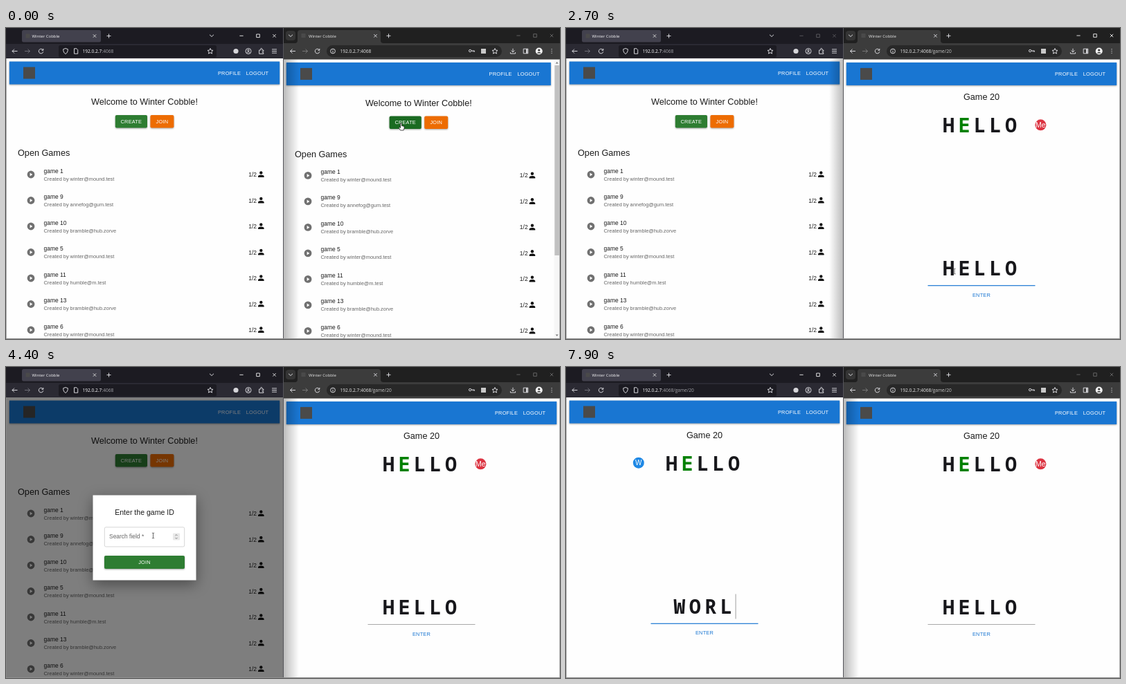
These frames come from a looping animation (800 by 450 pixels, 8 s). An HTML page:

```html
<!DOCTYPE html>
<html lang="en">
<head>
<meta charset="utf-8">
<title>Winter Cobble</title>
<style>
  html, body { margin: 0; width: 100%; height: 100%; overflow: hidden; background: #fff; }
  svg { display: block; width: 800px; height: 450px; }
  text { white-space: pre; font-family: "Liberation Sans", Arial, sans-serif; }
  .ui { font-family: "Open Sans", "Noto Sans", sans-serif; }
  .mono { font-family: "Noto Sans Mono", "DejaVu Sans Mono", monospace; font-weight: 700; }
  .raised { filter: drop-shadow(0 1px 1px rgba(0,0,0,.35)); }
  .dialog { filter: drop-shadow(0 6px 10px rgba(0,0,0,.4)); }
</style>
</head>
<body>
<svg id="stage" viewBox="0 0 800 450"></svg>
<script>
const LOOP = 8000;
const BLUE = '#1976d2', GREEN = '#2e7d32', ORANGE = '#ed6c02', INK = '#1c1c1c';
const APP = 'Winter Cobble', HOST = '192.0.2.7', PORT = ':4068';

// Markup helpers
const rect = (x, y, w, h, fill, more = '') =>
  `<rect x="${x}" y="${y}" width="${w}" height="${h}" fill="${fill}" ${more}/>`;
const circle = (x, y, r, fill, more = '') => `<circle cx="${x}" cy="${y}" r="${r}" fill="${fill}" ${more}/>`;
const text = (x, y, s, size, fill = INK, more = '') =>
  `<text x="${x}" y="${y}" font-size="${size}" fill="${fill}" ${more}>${s}</text>`;
const middle = 'text-anchor="middle"';
const group = (id, body, more = '') => `<g id="${id}" ${more}>${body}</g>`;
const icon = (x, y, d, color = '#e8e8ec', more = '') =>
  `<path transform="translate(${x} ${y})" d="${d}" fill="none" stroke="${color}" stroke-width=".9" ${more}/>`;
const label = (x, y, s, fill) => text(x, y, s, 7.39, fill, 'letter-spacing=".21" text-anchor="middle"');

const ICON = {
  back: 'M4 0H-3.5M-.5-3L-3.5 0L-.5 3',
  forward: 'M-4 0H3.5M.5-3L3.5 0L.5 3',
  reload: 'M3-1.5A3.3 3.3 0 1 0 3.3 .8M3.3-3.6V-1.2H.9',
  cross: 'M-2.2-2.2L2.2 2.2M2.2-2.2L-2.2 2.2',
  plus: 'M-3 0H3M0-3V3',
  chevron: 'M-3-1.3L0 1.5L3-1.3',
  dash: 'M-2.6 0H2.6',
  box: 'M-2.3-2.3H2.3V2.3H-2.3Z',
  shield: 'M0-4L3.3-2.8C3.3 .8 2.2 2.8 0 4C-2.2 2.8-3.3 .8-3.3-2.8Z',
  page: 'M-2.5-3.7H1L2.7-2V3.7H-2.5Z',
  star: 'M0-4L1.2-1.4L4-1.1L1.9 .8L2.5 3.6L0 2.1L-2.5 3.6L-1.9 .8L-4-1.1L-1.2-1.4Z',
  menu: 'M-3.5-2.6H3.5M-3.5 0H3.5M-3.5 2.6H3.5',
  user: 'M-4 0A4 4 0 1 1 4 0A4 4 0 1 1-4 0M-2.4 2.8C-1.5 .8 1.5 .8 2.4 2.8M-1.2-1A1.2 1.2 0 1 1 1.2-1A1.2 1.2 0 1 1-1.2-1',
  puzzle: 'M-3.4-1.5H-1.4V-3A1 1 0 0 1 .8-3V-1.5H2.8V.4H1.7A1 1 0 0 0 1.7 2.2H2.8V3.8H-3.4Z',
  info: 'M-3.4 0A3.4 3.4 0 1 1 3.4 0A3.4 3.4 0 1 1-3.4 0M0-.5V2M0-2V-1.2',
  key: 'M-4 0A1.7 1.7 0 1 1-.6 0A1.7 1.7 0 1 1-4 0M-.6 0H4V1.7M2.2 0V1.6',
  download: 'M0-3.8V1.2M-2.4-1L0 1.4L2.4-1M-3.6 1.6V3.5H3.6V1.6',
  panel: 'M-3.3-3.3H3.3V3.3H-3.3ZM1-3.3V3.3M2-3.3V3.3',
  dots: 'M0-3.4V-2.2M0-.6V.6M0 2.2V3.4'
};
const controls = (id, xs, y) =>
  group(id, ['dash', 'box', 'cross'].map((name, i) => icon(xs[i], y, ICON[name], '#f2f2f2')).join(''));

function foxChrome() {
  return rect(0, 0, 400, 23, '#1c1b22') + rect(0, 23, 400, 21, '#2b2a33') +
    rect(23, 3, 114, 17.5, '#42414d', 'rx="2.5"') + rect(28.5, 8.5, 6, 6, '#4a4a4a') +
    text(37.5, 14, APP, 6, '#f4f4f6', 'class="ui"') +
    icon(128, 11.5, ICON.cross, '#ddd') + icon(148.5, 11.5, ICON.plus) + icon(297, 11, ICON.chevron) +
    controls('foxControls', [340, 364, 387.5], 11.3) +
    rect(76, 25, 228, 17.5, '#1c1b22', 'rx="2.5"') +
    icon(12.5, 33.5, ICON.back) + icon(31, 33.5, ICON.forward, '#77767f') + icon(50.5, 33.5, ICON.reload) +
    icon(86, 33.5, ICON.shield) + icon(101, 33.5, ICON.page) +
    `<text class="ui" x="110.5" y="36" font-size="6.6" fill="#fbfbfe">${HOST}<tspan fill="#a3a3a9">${PORT}<tspan id="foxPath"></tspan></tspan></text>` +
    icon(295, 33.5, ICON.star) + circle(332, 33.5, 3.6, '#d6d6da') + icon(350, 33.5, ICON.user) +
    icon(369, 33.5, ICON.puzzle) + icon(387.5, 33.5, ICON.menu);
}

function darkChrome() {
  return rect(401, 0, 399, 22, '#202020') + rect(401, 22, 399, 23.5, '#3c3c3c') +
    '<path d="M417 22Q421 22 421 18V7Q421 3 425 3H537Q541 3 541 7V18Q541 22 545 22Z" fill="#3c3c3c"/>' +
    rect(404, 4, 14, 14, '#353535', 'rx="4"') + icon(411, 11, ICON.chevron) +
    rect(426.5, 8, 6, 6, '#4a4a4a') + text(437, 13.7, APP, 6, '#e6e6e6', 'class="ui"') +
    icon(533.5, 11.3, ICON.cross) + icon(552.5, 11.3, ICON.plus) +
    controls('darkControls', [740, 764, 788], 11) +
    rect(463, 25, 253, 17, '#282828', 'rx="8.5"') +
    icon(414, 33.5, ICON.back) + icon(432, 33.5, ICON.forward, '#7d7d7d') + icon(449.5, 33.5, ICON.reload) +
    icon(472, 33.5, ICON.info) +
    `<text class="ui" x="482.5" y="36" font-size="6.6" fill="#e8e8e8">${HOST}${PORT}<tspan id="darkPath" fill="#c4c4c4"></tspan></text>` +
    icon(672.5, 33, ICON.key) + rect(686, 30, 7, 7, '#c9c9c9') + icon(706, 33.5, ICON.star) +
    icon(732, 33.5, ICON.download) + icon(750.5, 33.5, ICON.panel) +
    circle(769.7, 33.5, 5, '#f2f2f2') + circle(769.7, 32, 1.6, '#333') +
    '<path d="M766.6 36.6Q769.7 32.8 772.8 36.6Z" fill="#333"/>' + icon(788, 33.5, ICON.dots, '#e8e8ec', 'stroke-width="1.3"');
}

const header = w =>
  rect(4.8, 48.5, w - 9.6, 33, BLUE, 'class="raised"') + rect(25, 56.5, 17, 17, '#4a4a4a') +
  label(w - 77.5, 67.6, 'PROFILE', '#fff') + label(w - 37, 67.6, 'LOGOUT', '#fff');

const button = (id, x, y, w, h, s, fill) =>
  rect(x, y, w, h, fill, `id="${id}" rx="2" class="raised"`) + label(x + w / 2, y + h / 2 + 2.7, s, '#fff');

const WINTER = 'winter@mound.test', BRAMBLE = 'bramble@hub.zorve';
const GAMES = [[1, WINTER], [9, 'annefog@gum.test'], [10, BRAMBLE], [5, WINTER],
  [11, 'humble@m.test'], [13, BRAMBLE], [6, WINTER]];

function gameRow([number, owner], i, w) {
  const y = 212 + i * 37.5, x = w - 31.7;
  return circle(36, y, 5.4, '#707070') + `<path d="M34.6 ${y - 2.5}L38.3 ${y}L34.6 ${y + 2.5}Z" fill="#fff"/>` +
    text(54.5, y - 2.4, 'game ' + number, 8.45) +
    text(54.5, y + 8.6, 'Created by ' + owner, 7.39, '#666') +
    text(w - 38, y + 3.1, '1/2', 8.45, INK, 'text-anchor="end"') +
    circle(x, y - 2.6, 2.2, '#111') +
    `<path d="M${x - 4.3} ${y + 4}V${y + 2.8}C${x - 4.3} ${y - .3} ${x + 4.3} ${y - .3} ${x + 4.3} ${y + 2.8}V${y + 4}Z" fill="#111"/>`;
}

function homePage(side, w) {
  const c = w / 2;
  return header(w) + text(c, 111.3, `Welcome to ${APP}!`, 12.67, INK, middle) +
    button(side + 'Create', c - 42.2, 126, 46.2, 18.6, 'CREATE', GREEN) +
    button(side + 'Join', c + 8.4, 126, 34, 18.6, 'JOIN', ORANGE) +
    text(17, 185.2, 'Open Games', 12.67) + GAMES.map((game, i) => gameRow(game, i, w)).join('');
}

// Spaced bold letters, centred as one run around x
const STEP = 22.5;
const word = (x, y, s, greenAt = -1) => [...s].map((ch, i) =>
  text(x - s.length * STEP / 2 + 8.9 + i * STEP, y, ch, 28.5, i === greenAt ? '#008000' : '#17171b', `class="mono" ${middle}`)).join('');

const gamePage = (side, avatar) =>
  header(400) + text(200, 103, 'Game 20', 12.67, INK, middle) +
  group(side + 'Guess', word(200, 149.7, 'HELLO', 1) + avatar) +
  group(side + 'Typed', '') + rect(200, 328.5, .7, 36, '#777', `id="${side}Caret"`) +
  rect(122.5, 370.7, 155, 1, '#949494', `id="${side}Line"`) + label(200, 387.4, 'ENTER', BLUE);

const avatar = (x, y, s, size, fill) => circle(x, y, 8, fill) + text(x, y + 3.6, s, size, '#fff', middle);

function dialog() {
  return rect(125.5, 185.5, 149, 123, '#fff', 'class="dialog"') +
    text(200, 214.2, 'Enter the game ID', 10.56, INK, middle) +
    rect(142.3, 231.8, 115.4, 28.2, 'none', 'id="fieldBox" rx="2"') +
    rect(147, 230, 42, 4, '#fff', 'id="notch"') +
    text(149, 248.3, 'Search field *', 8.45, '#666', 'id="fieldLabel"') +
    text(149, 248.6, '', 8.45, INK, 'id="fieldValue"') +
    rect(241, 240.5, 10, 10, '#e9e9e9', 'rx="1"') +
    icon(246, 243.3, 'M-1.6 .8L0-.8L1.6 .8M-1.6 3.6L0 5.2L1.6 3.6', '#777') +
    button('submit', 142, 273, 116, 19, 'JOIN', GREEN);
}

const scrollbar = rect(791.5, 46, 8.5, 403, '#f6f6f6') + rect(792.3, 54, 6.6, 275, '#c1c1c1') +
  '<path d="M793.6 51.5L795.6 49L797.6 51.5Z" fill="#777"/><path d="M793.6 443.5L795.6 446L797.6 443.5Z" fill="#777"/>';

const shade = (id, from, to) => `<linearGradient id="${id}">` +
  `<stop offset="0" stop-opacity="${from}"/><stop offset="1" stop-opacity="${to}"/></linearGradient>`;

const pointers =
  '<path id="arrow" d="M0 0V8.6L2 6.8L3.3 9.6L4.7 9L3.4 6.2H6Z" fill="#fff" stroke="#333" stroke-width=".8"/>' +
  '<path id="hand" d="M-.9 0Q0-.9 .9 0V3.4L4.6 4.4V7L3.6 10H-.9L-3.2 6.6L-2.3 5.5L-.9 6.6Z" fill="#fff" stroke="#222" stroke-width=".8"/>' +
  '<path id="beam" d="M-1.6-3.8H-.4L0-3.4L.4-3.8H1.6M0-3.4V3.4M-1.6 3.8H-.4L0 3.4L.4 3.8H1.6" fill="none" stroke="#444" stroke-width=".8"/>';

const stage = document.getElementById('stage');
stage.innerHTML =
  `<defs>${shade('rise', 0, .26)}${shade('fall', .26, 0)}</defs>` + rect(0, 0, 800, 450, '#fefefe') +
  group('foxHome', homePage('fox', 400)) +
  group('foxGame', gamePage('fox', avatar(104.8, 138.7, 'W', 10, '#1e88e5'))) +
  rect(0, 44, 400, 406, '#000', 'id="backdrop"') + group('dialog', dialog()) + foxChrome() +
  group('darkHome', homePage('dark', 391.6), 'transform="translate(400 1.4)"') + group('bar', scrollbar) +
  group('darkGame', gamePage('dark', avatar(285.4, 138.9, 'Me', 10.5, '#dc3341')), 'transform="translate(400 1.4)"') +
  darkChrome() +
  rect(380, 44, 20, 405, 'url(#rise)', 'id="shadeLeft"') + rect(401, 45.5, 22, 404, 'url(#fall)', 'id="shadeRight"') +
  rect(400, 0, 1, 450, '#55555a') + rect(0, 44, .7, 406, '#8a8a8a') + rect(799.3, 45, .7, 405, '#8a8a8a') +
  rect(0, 449, 800, 1, '#8f8f8f') + group('pointer', pointers);

const el = Object.fromEntries([...stage.querySelectorAll('[id]')].map(node => [node.id, node]));
const show = (id, on) => { el[id].style.display = on ? '' : 'none'; };
const set = (id, attrs) => { for (const key in attrs) el[id].setAttribute(key, attrs[key]); };
const clamp = v => Math.max(0, Math.min(1, v));
const ease = v => { const p = clamp(v); return p * p * (3 - 2 * p); };

// Pointer stops: time, x, y
const STOPS = [[0, 570.5, 138], [650, 570.5, 138], [1200, 561, 352], [2800, 561, 352], [3400, 224, 135],
  [3650, 224, 135], [4000, 207.5, 227], [4350, 212.5, 244], [5400, 212.5, 244], [5620, 222, 281],
  [5760, 222, 281], [6000, 255, 235.5], [6250, 255, 235.5], [6750, 205, 349], [LOOP, 205, 349]];
const SHAPES = [[0, 'hand'], [550, 'arrow'], [1120, 'beam'], [2850, 'arrow'], [3350, 'hand'], [3750, 'arrow'],
  [4230, 'beam'], [5440, 'arrow'], [5560, 'hand'], [5800, 'arrow'], [6650, 'beam'], [7250, 'none']];

function movePointer(t) {
  const i = STOPS.findIndex(stop => stop[0] > t), [t0, x0, y0] = STOPS[i - 1], [t1, x1, y1] = STOPS[i];
  const p = ease((t - t0) / (t1 - t0));
  set('pointer', { transform: `translate(${x0 + (x1 - x0) * p} ${y0 + (y1 - y0) * p})` });
  const shape = SHAPES.filter(s => s[0] <= t).pop()[1];
  for (const name of ['arrow', 'hand', 'beam']) show(name, name === shape);
}

function typeWord(t, side, s, focus, blur, first, gap) {
  const count = Math.max(0, Math.min(s.length, Math.floor((t - first) / gap) + 1));
  const lastEdit = count ? first + (count - 1) * gap : focus;
  const focused = t >= focus && t < blur;
  el[side + 'Typed'].innerHTML = word(200, 356.8, s.slice(0, count));
  show(side + 'Caret', focused && Math.floor((t - lastEdit) / 500) % 2 === 0);
  set(side + 'Caret', { x: 200.2 + count * STEP / 2 - (count ? .5 : 0) });
  set(side + 'Line', { fill: focused ? BLUE : '#949494', height: focused ? 1.2 : .8 });
}

function render(t) {
  const foxActive = t < 200 || t >= 3500;
  set('foxControls', { opacity: foxActive ? 1 : .3 });
  set('darkControls', { opacity: foxActive ? .35 : 1 });
  show('shadeLeft', !foxActive);
  show('shadeRight', foxActive);

  const darkGame = t >= 550, foxGame = t >= 5800;
  show('darkHome', !darkGame);
  show('bar', !darkGame);
  show('darkGame', darkGame);
  show('foxHome', !foxGame);
  show('foxGame', foxGame);
  el.darkPath.textContent = darkGame ? '/game/20' : '';
  el.foxPath.textContent = foxGame ? '/game/20' : '';
  set('darkCreate', { fill: '#1b6b22' });
  set('foxJoin', { fill: t >= 3350 && t < 4250 ? '#e05a00' : ORANGE });

  const open = t >= 3870 && !foxGame, focused = t >= 4500;
  show('backdrop', open);
  set('backdrop', { opacity: .5 * ease((t - 3870) / 400) });
  show('dialog', open);
  set('fieldBox', { stroke: focused ? BLUE : '#c4c4c4', 'stroke-width': focused ? 1.1 : .7 });
  show('notch', focused);
  const lift = ease((t - 4500) / 200);
  set('fieldLabel', { y: 248.3 - 15 * lift, 'font-size': 8.45 - 2.11 * lift, fill: focused ? BLUE : '#666' });
  el.fieldValue.textContent = t < 4800 ? '' : t < 5000 ? '2' : '20';
  set('submit', { fill: t >= 5560 ? '#1b5e20' : GREEN });

  show('darkGuess', t >= 2550);
  show('foxGuess', t >= 6500);
  typeWord(t, 'dark', 'HELLO', 1300, 3500, 1650, 125);
  typeWord(t, 'fox', 'WORL', 7000, LOOP, 7250, 180);
  movePointer(t);
}

function tick() {
  render(performance.now() % LOOP);
  requestAnimationFrame(tick);
}
tick();
</script>
</body>
</html>
```
